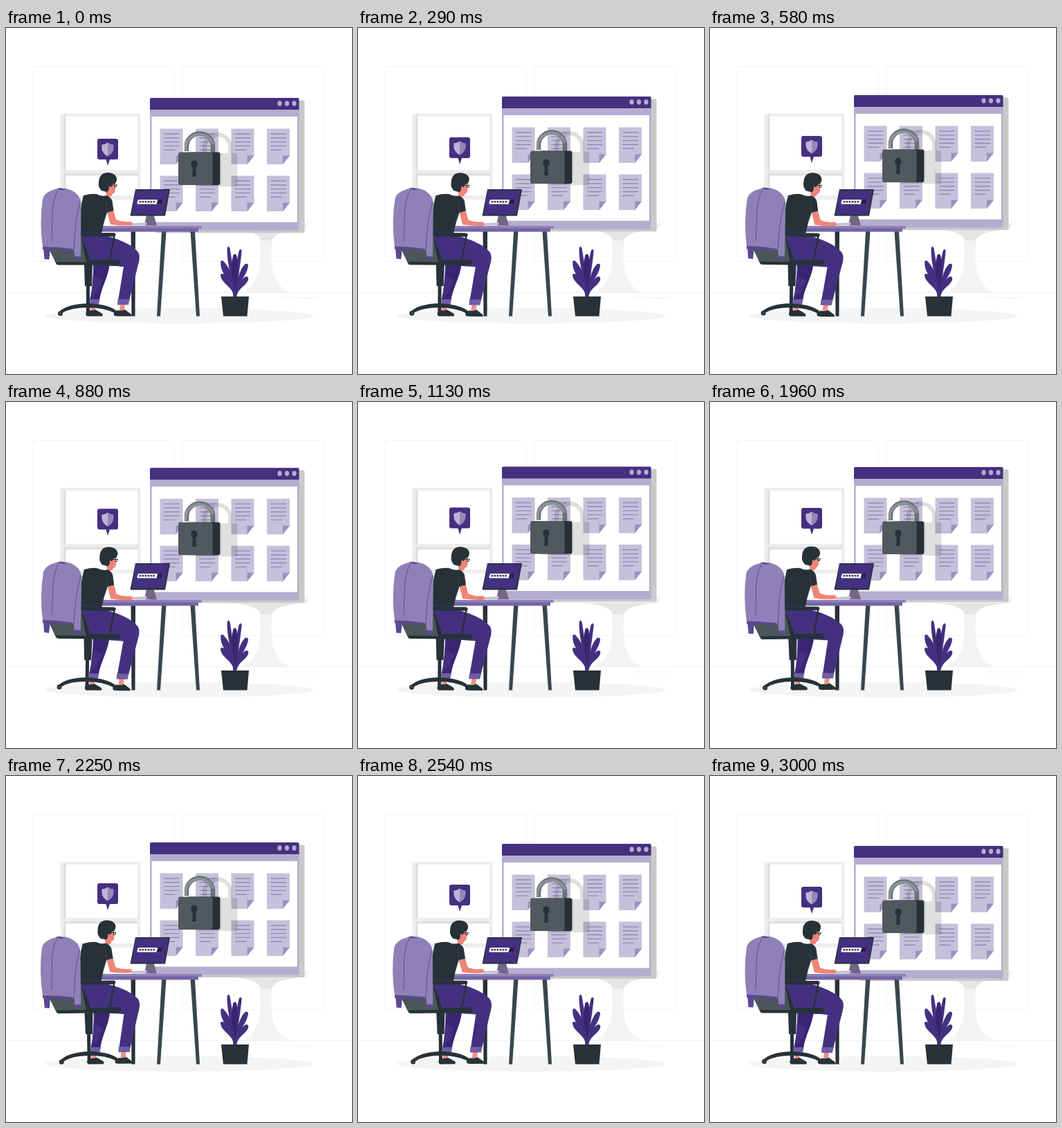
These frames come from a looping animation (500x500 px, 3.04 s). An HTML page:

```html
<!DOCTYPE html>
<html lang="en">
<head>
<meta charset="utf-8">
<title>Secure desk</title>
<style>
html, body { margin: 0; width: 100%; height: 100%; overflow: hidden; background: #fff; }
svg { display: block; width: 100vw; height: 100vh; }
.purple { fill: #453080; }
.lilac { fill: #8f81b7; }
.pale { fill: #b5adcf; }
.dark { fill: #263238; }
.skin { fill: #ee8577; }
.cuff { fill: #6f5da5; }
.line { fill: none; stroke-linecap: round; stroke-linejoin: round; }
</style>
</head>
<body>
<svg viewBox="0 0 500 500">
  <g id="room">
    <g fill="none" stroke="#f4f4f4">
      <rect x="39" y="55.5" width="203.5" height="282" rx="2"/>
      <rect x="254.5" y="55.5" width="204" height="282" rx="2"/>
      <path d="M0 382.5H500M400 390h16M420 390h30" stroke="#efefef"/>
    </g>
    <path fill="#ededed" d="M78.500 124H194.500V248H78.500Z"/>
    <path fill="#dfdfdf" d="M83 127.500h4V206h-4zM83 212h4v31h-4zM84 210h106v3H84z"/>
    <path fill="#fff" d="M86.500 128H190V205H86.500ZM86.500 213.500H190V242H86.500Z"/>
    <ellipse cx="250" cy="416" rx="194" ry="11" fill="#f4f4f4"/>
    <path fill="#f3f3f3" d="M366 300H385C381 340 383 372 411 382H340C367 374 371 340 366 300Z"/>
    <path fill="#e5e5e5" d="M316 290H432C410 293 389 295 384 307H369C364 295 346 292 316 290Z"/>
    <path fill="#f0f0f0" d="M283 282H436.500L434 290.500H283Z"/>
  </g>

  <g id="floating">
    <rect x="216" y="104.500" width="215.500" height="191.500" rx="2" fill="#c9c9c9"/>
    <rect x="208" y="101" width="215.500" height="191.500" rx="2" class="pale"/>
    <path class="purple" d="M208 118V103q0-2 2-2H421.500q2 0 2 2V118Z"/>
    <rect x="210.500" y="128" width="210.500" height="152.500" fill="#fff"/>
    <g id="dots" class="pale"></g>
    <g id="docs"></g>
    <g opacity=".12">
      <path class="line" stroke="#000" stroke-width="6" stroke-linecap="butt" d="M287 181V172.500a18.500 18.500 0 0 1 37 0V181"/>
      <rect x="274" y="181" width="60.500" height="48" rx="3"/>
    </g>
    <path fill="none" stroke="#697275" stroke-width="6.500" d="M261 178V171a19 18.500 0 0 1 38 0V180"/>
    <path fill="none" stroke="#8c9496" stroke-width="3.500" d="M259.800 177V170.500a20 19.500 0 0 1 39 -3"/>
    <rect x="262" y="179.500" width="47.500" height="47.500" rx="3" class="dark"/>
    <rect x="249" y="179.500" width="49.500" height="47.500" rx="3" fill="#50595e"/>
    <path class="dark" d="M270 199h4l.800 16h-5.600z"/>
    <ellipse cx="272" cy="197" rx="4.700" ry="5.700" class="dark"/>
    <path class="purple" d="M135 160H159q3 0 3 3V187q0 3-3 3H150L147 199L144.500 190H135q-3 0-3-3V163q0-3 3-3Z"/>
    <path fill="#bcb5d4" d="M147 165.500q-4 3-8.500 3v6q1 7 8.500 11z"/>
    <path fill="#9488bb" d="M147 165.500q4 3 8.500 3v6q-1 7-8.500 11z"/>
  </g>

  <g id="desk">
    <path class="dark" d="M180.500 294H187L186.500 416.500H181.500Z"/>
    <path fill="#37474f" d="M225 294h6.500L223 416.500H218ZM266.500 294h6.500L280 416.500H275Z"/>
    <rect x="138" y="286" width="145" height="4" rx="1.500" class="lilac"/>
    <rect x="138" y="289.500" width="140" height="5" rx="1" fill="#7565a6"/>
    <path fill="#716784" d="M203 270h10.500l4.500 15.500h-18z"/>
    <path fill="#c6c2d3" d="M184 282l20-1-2 4.500h-22z"/>
    <path class="dark" d="M187 233H237L230 271.500H179.500Z"/>
    <path class="purple" d="M187.500 234.500H235L228.500 269.500H181.500Z"/>
    <path fill="#fff" d="M191.500 248H219l-1.500 6.500H190q-1.500-3 1.500-6.500z"/>
    <path fill="#292044" d="M220 248h6l-1.500 6h-6z"/>
    <g id="code" fill="#263238"></g>
  </g>

  <g id="plant">
    <g class="purple">
      <path d="M329 390C326 360 319 338 319.500 319Q321 313 323.500 318C328 345 329 350 333 390Z"/>
      <path d="M329 390C329 365 333 335 337 321Q341 318 340.500 324C338 348 335 360 333 390Z"/>
      <path d="M329 390C325 365 325 340 328.500 328Q332 324 333.500 330C336 350 333 370 333 390Z" fill="#38256f"/>
      <path d="M330 388C326 362 308 356 310.500 337Q313 334 316 339C326 350 328 362 332 388Z"/>
      <path d="M330 388C334 364 337 350 345.500 341Q350 339 350 344C347 360 337 364 333 388Z"/>
      <path d="M330 388C326 372 310 369 310 356Q313 353 318 358C326 365 329 375 332 388Z"/>
      <path d="M330 388C334 374 340 362 347 359Q351 359 350 364C347 373 337 374 333 388Z"/>
    </g>
    <path class="dark" d="M311 388H351L348.500 416.500H314Z"/>
  </g>

  <g id="sitter">
    <path class="skin" fill-opacity=".9" d="M122 399h7v10h-7zM165 399h7l-1 9h-7z"/>
    <path fill="#392572" d="M126 340H150C148 360 137 376 135 394H121C125 375 127 360 126 340Z"/>
    <path class="cuff" d="M121.500 392H135.500L134 400H121Z"/>
    <path class="dark" d="M117 408q9 1 12-1l9 5q3 2 1 4.500H117zM160 408q8 1 12-1l8 6q2 1 1 3.500H160z"/>
    <path class="purple" d="M107 299L142 300C162 304 184 314 191 324Q194 329 192 338L178 394H162L170 345C150 343 125 344 118 338Z"/>
    <path class="purple" d="M127 340H150L133 380 123 392Z"/>
    <path fill="#392572" d="M129 342H149L140 364Q132 362 127 358Z"/>
    <path class="cuff" d="M161.500 392H178.500L177 400H161Z"/>
    <path class="skin" d="M143 232L156 229 153 242Q150 245 145 242Z"/>
    <path class="skin" d="M145 224L157 223 158 234Q157 240 152 240L145 237Z"/>
    <path class="dark" d="M134 224C134 213 140 209 147 209C156 209 161 214 160 220L158 225H155Q153 227 152 230L149 228Q149 235 146 237L138 235Q133 230 134 224Z"/>
    <path class="line" stroke="#263238" d="M151 227H160M157 226v4q3 1 3-4"/>
    <path class="skin" d="M145 262L155 262 159 277Q169 281 180 279.500L184 283 180 285.500Q166 286 151 284Z"/>
    <path class="dark" d="M112 242Q123 239 131 240Q138 244 146 242Q152 245 153.500 250L155.500 264 146 266.500 141 283 137 301 107 298Q105 265 112 242Z"/>
    <path class="line" stroke="#455158" stroke-width=".7" d="M145 250L146 266 141 280"/>
    <path class="dark" d="M106 295L138 296H155q4 0 3.500 3.500l-2 2H108z"/>
    <path class="line" stroke="#263238" stroke-width="2.500" d="M156.500 300L150 335"/>
    <path class="line" stroke="#453080" stroke-width=".8" d="M108 294l30 3"/>
    <path fill="#4b565b" d="M62 319L104 300H109L120 336 116 342H73Z"/>
    <path class="dark" d="M108 301Q118 318 121 335H163q2 0 2 2v4l-3 1.500H75L72 338H116Z"/>
    <path class="dark" d="M113 342h12l-1 31h-10zM116 372h5v39h-5z"/>
    <path class="dark" d="M76 411Q87 399 118 398Q151 399 162 411L157 412Q142 404 118 404Q94 404 81 412Z"/>
    <g class="dark"><circle cx="78.500" cy="412.500" r="3.500"/><circle cx="159" cy="413" r="3.200"/><circle cx="118.500" cy="413" r="3.200"/></g>
    <circle cx="78.500" cy="412.500" r="1.300" fill="#455a64"/>
    <path class="cuff" d="M54 317H64L62.500 334.500 55.500 334Z" style="fill:#5b4793"/>
    <path class="lilac" d="M53 247Q56 236 75 232H87Q105 236 108.500 252L108 333H99.500L98 319 94 321Q73 317 53 317Q48 281 53 247Z"/>
    <path fill="#5b4793" d="M53 316Q74 316 95 319V323Q74 319 53 320ZM99 330H108V334H99ZM73 232L78 231 87 233 81 234.500Z"/>
    <path class="line" stroke="#5b4793" stroke-width=".9" d="M75 234Q66 251 67 276L66 308M107 252Q102 270 100 290L98 320"/>
  </g>
</svg>
<script>
const LOOP = 3040, CYCLE = 3000, FPS = 24;
const byId = id => document.getElementById(id);
const fill = (id, items, draw) => { byId(id).innerHTML = items.map(draw).join(''); };

fill('dots', [395.5, 406, 416.500], x => `<ellipse cx="${x}" cy="109" rx="3.100" ry="3.700"/>`);
fill('code', [0, 1, 2, 3, 4, 5], i => `<circle cx="${193.800 + i * 4}" cy="251.200" r="1.350"/>`);

const rules = [7.5, 13.3, 19.1, 24.9, 30.7]
  .map((y, i) => `M5.500 ${y}h${i < 4 ? 22.5 : 16.5}`).join('');
const cells = [0, 1, 2, 3, 4, 5, 6, 7].map(i => [222.5 + (i % 4) * 51.5, i < 4 ? 145.5 : 213.5]);
fill('docs', cells, ([x, y]) => `<g transform="translate(${x} ${y})">
  <path fill="#c6c0da" d="M0 0H33V39L23 51.500H0Z"/>
  <path fill="#9b90c0" d="M33 39H23V51.500Z"/>
  <path fill="none" stroke="#9488bb" stroke-width="1.400" d="${rules}"/></g>`);

// Linear rise and fall: 0 -> 1 -> 0 over one cycle.
const rise = p => 1 - Math.abs(1 - 2 * p);
// Linear sway: 0 -> 1 -> -1 -> 0, turning at the quarters.
const sway = p => p < .25 ? 4 * p : p < .75 ? 2 - 4 * p : 4 * p - 4;

function render(ms) {
  const step = Math.floor((ms % LOOP + 4) * FPS / 1000);
  const p = Math.min(step * 1000 / FPS / CYCLE, 1);
  byId('floating').setAttribute('transform', `translate(0 ${-10 * rise(p)})`);
  byId('sitter').setAttribute('transform', `rotate(${sway(p)} 121 313)`);
}

const start = performance.now();
function tick() {
  render(performance.now() - start);
  requestAnimationFrame(tick);
}
render(0);
requestAnimationFrame(tick);
</script>
</body>
</html>
```
